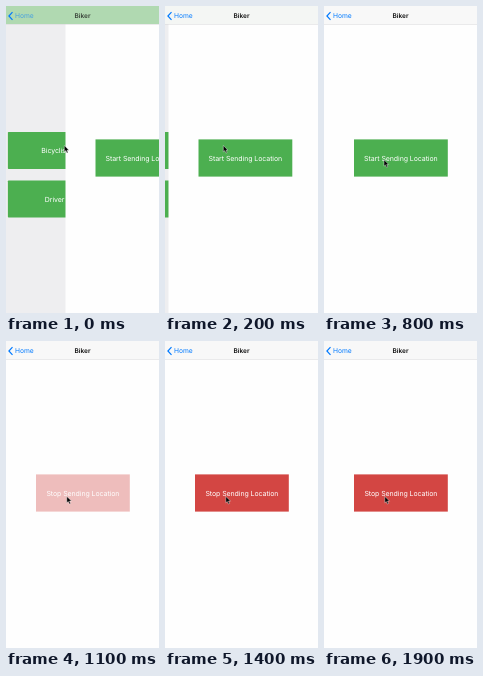
An HTML page for the animation above (2 s loop, 153 by 307 pixels).

```html
<!DOCTYPE html>
<html lang="en">
<head>
<meta charset="utf-8">
<style>
  html, body { margin: 0; width: 100%; height: 100%; overflow: hidden; background: #fefefe; }
  svg { display: block; width: 153px; height: 307px; }
  text { font: 7px Inter, "Noto Sans", sans-serif; text-rendering: geometricPrecision; }
  .label { fill: #fff; text-anchor: middle; letter-spacing: -.08px; }
  .green { fill: #4caf50; }
  #back { font-size: 6.7px; fill: #007aff; }
  #title { font-size: 6.5px; font-weight: 600; text-anchor: middle; fill: #111; }
</style>
</head>
<body>
<svg viewBox="0 0 153 307">
  <rect width="153" height="307" fill="#eeeef0"/>
  <g id="home">
    <rect class="green" x="30" y="126" width="93.5" height="37" rx=".7"/>
    <text class="label" x="76.7" y="147.2">Bicyclist</text>
    <rect class="green" x="30" y="174.5" width="93.5" height="37" rx=".7"/>
    <text class="label" x="76.7" y="195.5">Driver</text>
  </g>
  <g id="page">
    <rect width="153" height="307" fill="#fefefe"/>
    <g id="button">
      <rect id="face" x="30" y="133.4" width="93.8" height="37.2"/>
      <text id="caption" class="label" x="76.9" y="154.7"></text>
    </g>
  </g>
  <rect width="153" height="18" fill="#f8f8f8"/>
  <rect id="tint" class="green" width="153" height="18"/>
  <rect y="18" width="153" height=".5" fill="#d5d5d7"/>
  <path d="M6.5 6.2 2.9 10l3.6 3.8" fill="none" stroke="#007aff" stroke-width="1.2"/>
  <text id="back" x="9" y="12.4">Home</text>
  <text id="title" x="76.5" y="12.3">Biker</text>
  <path id="cursor" d="M0 0v6.4l1.5-1.3 1.1 2.5 1.2-.5-1.1-2.4h2z"
        fill="#000" stroke="#fff" stroke-width=".4"/>
</svg>
<script>
  const LOOP = 2000, STEP = 100, TOGGLE = 1050;
  const el = id => document.getElementById(id);
  const move = (id, x, y) => el(id).setAttribute('transform', `translate(${x} ${y})`);
  const clamp = v => Math.max(0, Math.min(1, v));

  // Piecewise linear interpolation through [time, value] points.
  function along(points, t) {
    let value = points[0][1];
    for (let i = 1; i < points.length; i++) {
      const [t0, v0] = points[i - 1], [t1, v1] = points[i];
      if (t >= t0) value = v0 + (v1 - v0) * clamp((t - t0) / (t1 - t0));
    }
    return value;
  }

  function draw(t) {
    const left = t < 600 ? Math.exp(-t / 70.6) : 0;
    const offset = 59.5 * left;
    move('page', offset, 0);
    move('home', -46 * (1 - offset / 153), 0);
    el('tint').style.opacity = .42 * left;
    el('back').style.opacity = 1 - .4 * left;
    el('title').style.opacity = 1 - .25 * left;

    const stopped = t < TOGGLE;
    el('face').style.fill = stopped ? '#4caf50' : '#d34643';
    el('caption').textContent = (stopped ? 'Start' : 'Stop') + ' Sending Location';
    el('button').style.opacity =
      along([[800, 1], [1000, .4], [1100, .35], [1200, .62], [1300, .93], [1400, 1]], t);

    move('cursor',
      along([[600, 58.3], [800, 60], [1000, 60.8]], t),
      along([[600, 139.5], [800, 153.8], [1000, 155.4]], t));
  }

  function tick() {
    draw(Math.floor(performance.now() % LOOP / STEP) * STEP);
    requestAnimationFrame(tick);
  }
  tick();
</script>
</body>
</html>
```
